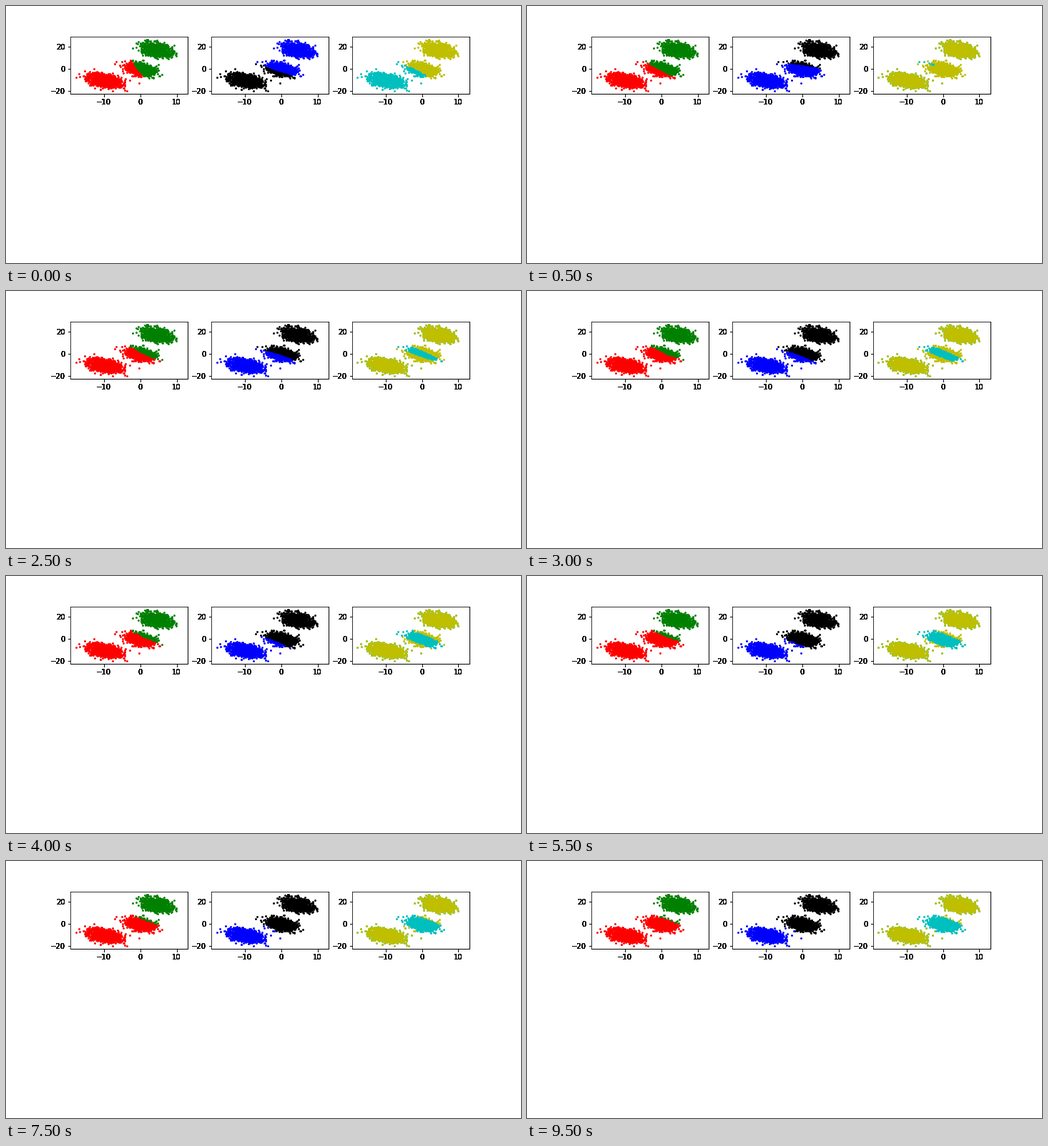
A matplotlib script for the animation above (10 s loop, 720x360 px).

```python
import numpy as np
import matplotlib.pyplot as plt
from matplotlib.animation import FuncAnimation

FRAMES, INTERVAL = 20, 500
W, H = 720, 360
PANEL_W, PANEL_TOP, PANEL_BOTTOM = 164.12, 43.2, 123.4
XLIM, YLIM = (-19.2, 13.05), (-22.6, 28.8)
LABEL_PASSES = 8  # repeated drawing gives the heavy labels

plt.rcParams["font.family"] = "DejaVu Sans"
plt.rcParams["font.size"] = 10
rng = np.random.default_rng(7)


def cluster(center, sigma=(2.05, 3.0), rho=-0.36, count=1000):
    """Correlated Gaussian blob."""
    u, v = rng.standard_normal((2, count))
    blob = np.column_stack([u, rho * u + np.sqrt(1 - rho ** 2) * v])
    return blob * sigma + center


top = cluster((4.6, 17.2))
middle = cluster((0, -0.2), sigma=(1.9, 2.8))
bottom = cluster((-9.6, -10.3), sigma=(2.3, 3.0))
points = np.vstack([top, middle, bottom])
outer = np.vstack([top, bottom])


def above(left, right):
    """Points above the line through (-5, left) and (5, right)."""
    x, y = points.T
    return y > left + (right - left) * (x + 5) / 10


def classify(step):
    """Masks of the points picked out in each of the three panels."""
    if step == 0:  # untrained guess
        return above(17.2, -21.9), above(3.4, -7.0), ~above(4.3, -12.6)
    learned = 1 - np.exp(-(step - 1) / 8)
    green = above(8 + 4.9 * learned, -9.5 + 10.5 * learned)
    blue = ~above(5 - 8.5 * learned ** 2, 0.5 - 20 * learned)
    return green, blue, ~green & ~blue


fig = plt.figure(figsize=(W / 72, H / 72), dpi=72, facecolor="white")


def make_panel(column):
    rect = [(90 + column * 1.2 * PANEL_W) / W, 1 - PANEL_BOTTOM / H,
            PANEL_W / W, (PANEL_BOTTOM - PANEL_TOP) / H]
    for i in range(LABEL_PASSES):
        ax = fig.add_axes(rect, label=f"{column}-{i}")
        ax.set(xlim=XLIM, ylim=YLIM, xticks=[-10, 0, 10], yticks=[-20, 0, 20])
    return ax


def dots(ax, data, color):
    return ax.scatter(*data.T, s=2, c=color, linewidths=1.5)


panels = [make_panel(column) for column in range(3)]
undercoat = dots(panels[2], outer, "c")
layers = [(dots(ax, points, rest), dots(ax, points, chosen))
          for ax, rest, chosen in zip(panels, "rky", "gbc")]


def update(step):
    for (rest, chosen), mask in zip(layers, classify(step)):
        rest.set_offsets(points[~mask])
        chosen.set_offsets(points[mask])
    undercoat.set_visible(step > 0)
    return [undercoat, *(dot for pair in layers for dot in pair)]


anim = FuncAnimation(fig, update, frames=FRAMES, interval=INTERVAL,
                     repeat=True, repeat_delay=0, blit=False)
plt.show()
```
